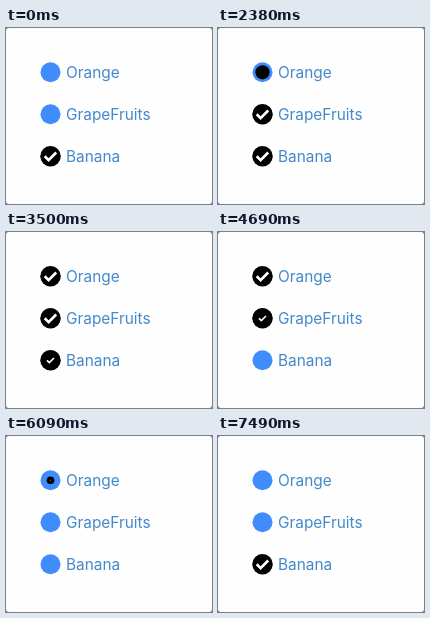
An HTML page with a canvas for the animation above (8.19 s loop, 206x176 px).

```html
<!DOCTYPE html>
<html lang="en">
<head>
<meta charset="utf-8">
<title>Animated checkboxes</title>
<style>
  html, body { margin: 0; width: 100%; height: 100%; overflow: hidden; background: #fff; }
  canvas { display: block; width: 206px; height: 176px; }
</style>
</head>
<body>
<canvas id="stage"></canvas>
<script>
const W = 206, H = 176, LOOP = 8190, STEP = 70;
const BLUE = '#3f8cfa', BLACK = '#000', WHITE = '#fefefe', TEXT = '#4389cb';

// Each toggle is [start time, becomes checked].
const rows = [
  { label: 'Orange', y: 44.3, checked: false, toggles: [[2310, true], [5950, false]] },
  { label: 'GrapeFruits', y: 86.3, checked: false, toggles: [[1120, true], [4690, false]] },
  { label: 'Banana', y: 128.3, checked: true, toggles: [[3500, false], [7140, true]] }
];

const canvas = document.getElementById('stage');
const ctx = canvas.getContext('2d');
const ratio = window.devicePixelRatio || 1;
canvas.width = W * ratio;
canvas.height = H * ratio;

const clamp = v => Math.max(0, Math.min(1, v));
const easeOut = v => 1 - (1 - v) ** 2;

// Scales of the black disc and of the tick inside it.
function pose(row, time) {
  const last = row.toggles.filter(([start]) => time >= start).pop();
  if (!last) return row.checked ? { disc: 1, tick: 1 } : { disc: 0, tick: 0 };
  const [start, on] = last;
  const age = time - start + STEP;
  if (on) {
    const bump = 0.07 * Math.sin(Math.PI * clamp((age - 240) / 180));
    return {
      disc: easeOut(clamp(age / 310)) + bump,
      tick: easeOut(clamp((age - 165) / 245))
    };
  }
  return {
    disc: 1 - clamp((age - 70) / 215) ** 1.1,
    tick: 1 - clamp(age / 270) ** 0.7
  };
}

function disc(radius, color) {
  ctx.fillStyle = color;
  ctx.beginPath();
  ctx.arc(0, 0, radius, 0, Math.PI * 2);
  ctx.fill();
}

function tick(scale) {
  ctx.save();
  ctx.scale(scale, scale);
  ctx.strokeStyle = WHITE;
  ctx.lineWidth = 2.7;
  ctx.beginPath();
  ctx.moveTo(-5.8, 0);
  ctx.lineTo(-1.9, 3.8);
  ctx.lineTo(5.7, -3.8);
  ctx.stroke();
  ctx.restore();
}

function drawRow(row, time) {
  const state = pose(row, time);
  ctx.save();
  ctx.translate(44.5, row.y);
  disc(10, BLUE);
  if (state.disc > 0.01) disc(10.2 * state.disc, BLACK);
  if (state.tick > 0.01) tick(state.tick);
  ctx.restore();
  ctx.fillStyle = TEXT;
  ctx.fillText(row.label, 60, row.y + 5.7);
}

function draw(now) {
  const time = Math.floor((now % LOOP) / STEP) * STEP;
  ctx.setTransform(ratio, 0, 0, ratio, 0, 0);
  ctx.fillStyle = '#777';
  ctx.fillRect(0, 0, W, H);
  ctx.fillStyle = WHITE;
  ctx.beginPath();
  ctx.roundRect(0, 0, W, H, 3);
  ctx.fill();
  ctx.font = '15.4px Inter, sans-serif';
  rows.forEach(row => drawRow(row, time));
}

let origin;
function frame(now) {
  origin ??= now;
  draw(now - origin);
  requestAnimationFrame(frame);
}
requestAnimationFrame(frame);
</script>
</body>
</html>
```
